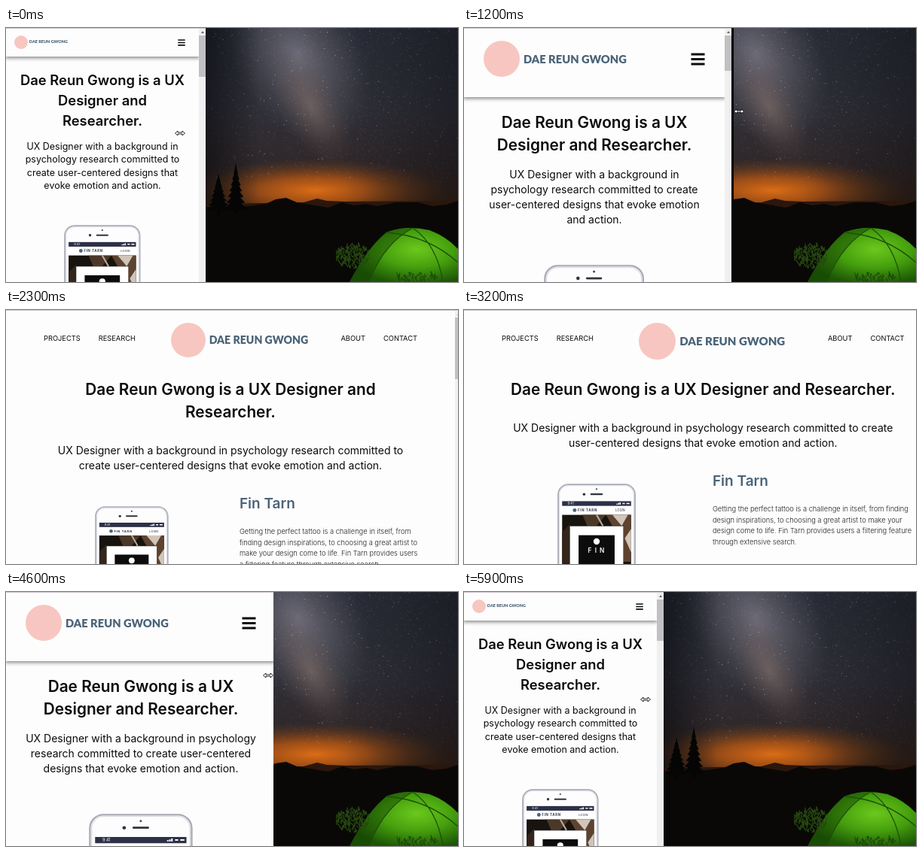
These frames come from a looping animation (600 by 338 pixels, 6 s). An HTML page:

```html
<!DOCTYPE html>
<html lang="en">
<head>
<meta charset="utf-8">
<title>Responsive page resize</title>
<style>
html, body { margin: 0; width: 100%; height: 100%; overflow: hidden; background: #000; }
#stage { position: relative; width: 600px; height: 338px; overflow: hidden; font-family: Inter, Roboto, sans-serif; font-optical-sizing: none; }
#stage > * { position: absolute; left: 0; top: 0; }
#gap { height: 338px; background: #000; }
#win { height: 338px; overflow: hidden; background: #fefdfe; color: #0b0b0d; }
#win::after { content: ""; position: absolute; left: 0; top: 0; width: 100%; height: 1px; background: #cfc6cb; }
#page { position: absolute; left: 0; top: 0; width: var(--w); height: 338px; overflow: hidden; }

header { position: absolute; width: 100%; height: 92px; background: #fefdfe; box-shadow: 0 1px 5px 1px #858585; }
.logo { position: absolute; left: 26px; top: 17px; display: flex; align-items: center; gap: .34em; white-space: nowrap;
  font: 900 14.7px/1 Lato, sans-serif; color: #4a6478; }
.logo i { width: 3.27em; height: 3.27em; border-radius: 50%; background: #f7c6c0; }
.menu { position: absolute; right: 26px; top: 33px; width: 19px; }
nav { position: absolute; top: 31px; display: none; gap: 24px; font-size: 9.3px; line-height: 13px; }
nav.l { left: 50px; }
nav.r { right: 50px; }

main { padding-top: 111px; text-align: center; }
h1 { margin: 0 25px; font-weight: 600; font-size: 20.8px; line-height: 30px; }
h1 br { display: none; }
.sub { margin: 14px 25px 50px; font-size: 14px; line-height: 20px; }
.row { position: relative; text-align: left; }
.phone { display: block; margin: auto; width: calc(var(--w) * .385); }
.work { display: none; position: absolute; left: calc(var(--w) * .52); top: -13px; width: max(212px, calc(var(--w) * .78 - 224px)); }
h2 { margin: 0 0 20px; font-weight: 600; font-size: 19px; line-height: 20px; color: #4a6478; }
.work p { margin: 0; font-weight: 300; font-size: 9.3px; line-height: 14.7px; color: #222; }

.small header { height: 38px; }
.small .logo { left: 11px; top: 10px; font-size: 5.5px; }
.small .menu { right: 18.5px; top: 15px; width: 10px; }
.small main { padding-top: 55.5px; }
.small h1 { margin: 0 12px; font-size: 18.4px; line-height: 27px; }
.small h1 br { display: inline; }
.small .sub { margin: 12px 22px 43px; font-size: 12.5px; line-height: 17.6px; }
.small .phone { width: calc(var(--w) * .397); }

.large header { box-shadow: none; }
.large .logo { left: calc(var(--w) * .346 + 12.5px); font-size: calc(var(--w) * .0237); }
.large .menu { display: none; }
.large nav { display: flex; }
.large main { padding-top: 91px; }
.large h1 { margin: 0 50px; }
.large .sub { margin: 26px 48.5px 44px; }
.large .phone { margin-left: calc(var(--w) * .154 + 26.4px); width: calc(var(--w) * .164); }
.large .work { display: block; }

#bar { position: absolute; left: var(--w); top: 1px; width: 9px; height: 337px; background: #f1f0f1; }
#bar::before { content: ""; position: absolute; left: 2.5px; top: 3px; border: 2px solid transparent; border-top: 0; border-bottom: 3px solid #666; }
#bar i { position: absolute; left: 0; top: 9px; width: 9px; height: 47px; background: #c1c0c2; }
.small #bar i { height: 55px; }
.large #bar i { height: 82px; }
</style>
</head>
<body>
<div id="stage">
  <svg width="600" height="338" viewBox="0 0 600 338">
    <defs>
      <linearGradient id="sky" x2="0" y2="1">
        <stop stop-color="#292c37"/><stop offset=".45" stop-color="#2f3038"/>
        <stop offset=".75" stop-color="#30282a"/><stop offset="1" stop-color="#3a2312"/>
      </linearGradient>
      <radialGradient id="glow"><stop stop-color="#dc6d15"/><stop offset=".4" stop-color="#b45716" stop-opacity=".8"/><stop offset="1" stop-color="#6e3d1c" stop-opacity="0"/></radialGradient>
      <radialGradient id="milk"><stop stop-color="#84818e" stop-opacity=".75"/><stop offset=".5" stop-color="#726f7b" stop-opacity=".4"/><stop offset="1" stop-color="#5a5862" stop-opacity="0"/></radialGradient>
      <radialGradient id="dust"><stop stop-color="#86716a" stop-opacity=".6"/><stop offset="1" stop-color="#5c4c48" stop-opacity="0"/></radialGradient>
      <linearGradient id="shade"><stop offset=".44" stop-color="#07080c" stop-opacity=".6"/><stop offset=".56" stop-color="#07080c" stop-opacity="0"/>
        <stop offset=".75" stop-color="#07080c" stop-opacity="0"/><stop offset="1" stop-color="#07080c" stop-opacity=".4"/></linearGradient>
      <radialGradient id="tent" cx=".62" cy=".4" r=".65"><stop stop-color="#6cc81c"/><stop offset=".5" stop-color="#46a00e"/><stop offset="1" stop-color="#1d5606"/></radialGradient>
    </defs>
    <rect width="600" height="240" fill="url(#sky)"/>
    <ellipse cx="388" cy="38" rx="125" ry="85" fill="url(#milk)" transform="rotate(60 388 38)"/>
    <ellipse cx="405" cy="105" rx="85" ry="42" fill="url(#dust)" transform="rotate(62 405 105)"/>
    <ellipse cx="410" cy="216" rx="175" ry="42" fill="url(#glow)"/>
    <path id="faint" stroke="#c9cbd8" stroke-width=".8" opacity=".22"/>
    <path id="bright" stroke="#f1f0f5" stroke-width="1" opacity=".5"/>
    <rect width="600" height="240" fill="url(#shade)"/>
    <path d="M260 240V234L340 233L395 232L413 227L426 230L450 231L600 230V240Z" fill="#2b160c"/>
    <path d="M0 338V238H290L322 237L345 234L358 228L372 226L386 232L404 235L428 239L446 232L462 236L478 234L492 237L518 232L546 232L566 237L584 235L600 230V338Z" fill="#090807"/>
    <path id="trees" fill="#050505"/>
    <path d="M456 338Q480 292 505 272Q530 262 562 269Q584 277 600 294V338Z" fill="url(#tent)"/>
    <path d="M456 338Q480 292 505 272Q514 267 540 266Q500 288 482 338Z" fill="#123f04" opacity=".45"/>
    <path d="M540 266Q500 288 482 338M540 266Q572 288 580 338M505 272Q560 276 600 312" fill="none" stroke="#1a5206" stroke-width="1.3"/>
    <path id="bush" fill="none" stroke="#26480f" stroke-width="1.3"/>
    <path id="grass" fill="none" stroke="#1c4a0a" stroke-width="1.2"/>
  </svg>
  <div id="gap"></div>
  <div id="win">
    <div id="page">
      <header>
        <nav class="l"><span>PROJECTS</span><span>RESEARCH</span></nav>
        <div class="logo"><i></i><span>DAE REUN GWONG</span></div>
        <nav class="r"><span>ABOUT</span><span>CONTACT</span></nav>
        <svg class="menu" viewBox="0 0 19 17"><path d="M.5 2H18.5M.5 8.5H18.5M.5 15H18.5" stroke="#0b0b0d" stroke-width="3"/></svg>
      </header>
      <main>
        <h1>Dae Reun Gwong is a UX Designer and <br>Researcher.</h1>
        <p class="sub">UX Designer with a background in psychology research committed to create user-centered designs that evoke emotion and action.</p>
        <div class="row">
          <svg class="phone" viewBox="0 0 100 200" font-family="Inter, sans-serif">
            <rect x="1" y="1" width="98" height="198" rx="13" fill="#fdfdfe" stroke="#a9acb6" stroke-width="1.7"/>
            <rect x="2.6" y="2.6" width="94.8" height="194.8" rx="11.5" fill="none" stroke="#dcdde2"/>
            <circle cx="50" cy="7" r="1.1" fill="#444850"/>
            <circle cx="34" cy="13.6" r="1.7" fill="#30333c"/>
            <path d="M43 13.6H57" stroke="#30333c" stroke-width="2" stroke-linecap="round"/>
            <rect x="6" y="22.5" width="88" height="160" fill="#fff"/>
            <rect x="6" y="22.5" width="88" height="6" fill="#2d3147"/>
            <text x="13" y="27" font-size="4" fill="#fff">9:41</text>
            <path d="M76 26.8v-1.2M78 26.8v-2M80 26.8v-2.8M83 25.4h3M88 25.4h4" stroke="#fff" stroke-width="1.5"/>
            <circle cx="22" cy="34" r="2.4" fill="#4a6478"/>
            <text x="26" y="35.5" font-size="4.2" font-weight="700" letter-spacing=".7" fill="#2d3147">FIN TARN</text>
            <text x="74" y="35.5" font-size="4" fill="#2d3147">LOGIN</text>
            <rect x="6" y="40" width="88" height="143" fill="#17130f"/>
            <path d="M32 40H62L50 54H38Z" fill="#4b3828"/>
            <path d="M62 40H94V100H84V54H70Z" fill="#5d4330"/>
            <path d="M70 40l12 14 8-14zM86 70l8-12v30z" fill="#d1c5ba"/>
            <path d="M6 62l10-10v50H6z" fill="#33251b"/>
            <path d="M50 40l8 14" stroke="#b9aa9c" stroke-width="2"/>
            <rect x="16" y="54.5" width="68" height="90" fill="#fff"/>
            <rect x="27" y="66" width="46" height="66" fill="#0d0c0d"/>
            <circle cx="50" cy="74" r="4" fill="#fff"/>
            <text x="51.5" y="88" font-size="8" font-weight="600" letter-spacing="4" text-anchor="middle" fill="#fff">FIN</text>
          </svg>
          <div class="work">
            <h2>Fin Tarn</h2>
            <p>Getting the perfect tattoo is a challenge in itself, from finding design inspirations, to choosing a great artist to make your design come to life. Fin Tarn provides users a filtering feature through extensive search.</p>
          </div>
        </div>
      </main>
    </div>
    <div id="bar"><i></i></div>
  </div>
  <svg id="cursor" width="16" height="10" viewBox="-8 -5 16 10">
    <path d="M-6.5 0L-3 -3V-1H3V-3L6.5 0L3 3V1H-3V3Z" fill="#fff" stroke="#111" stroke-width=".9"/>
  </svg>
</div>
<script>
const $ = id => document.getElementById(id);
const LOOP = 6000, STEP = 100;

// time, layout width, visible edge, dark gap, pointer x, pointer y
const KEYS = [
  [0, 265, 265, 0, 231, 140],
  [500, 265, 265, 0, 250, 132],
  [800, 289, 289, 2, 294, 123],
  [1200, 355, 355, 3, 365, 111],
  [1900, 558, 562, 5, 567, 97],
  [2300, 605, 608, 5, 640, 97],
  [2900, 645, 645, 5, 660, 97],
  [3500, 642, 640, 6, 638, 97],
  [3800, 571, 565, 6, 559, 97],
  [4200, 462, 455, 3, 448, 104],
  [4600, 367, 355, 0, 348, 111],
  [4900, 290, 278, 0, 270, 120],
  [5200, 267, 265, 0, 246, 134],
  [5900, 265, 265, 0, 241, 143],
  [LOOP, 265, 265, 0, 231, 140]
];

function pose(t) {
  const i = KEYS.findIndex(k => k[0] > t);
  const a = KEYS[i - 1], b = KEYS[i];
  const u = (t - a[0]) / (b[0] - a[0]);
  return a.map((v, n) => v + (b[n] - v) * u);
}

let seed = 7;
const rnd = () => (seed = seed * 16807 % 2147483647) / 2147483647;

function scatter(id, count, mark) {
  $(id).setAttribute("d", Array.from({ length: count }, mark).join(""));
}

const star = () => `M${(255 + rnd() * 345).toFixed(1)} ${(rnd() ** 1.2 * 205).toFixed(1)}h1`;

// Short strokes fanning out of an elliptical clump
const leaf = (cx, cy, rx, ry) => () => {
  const a = rnd() * 2 * Math.PI, r = Math.sqrt(rnd());
  const x = cx + Math.cos(a) * r * rx, y = cy + Math.sin(a) * r * ry;
  return `M${x.toFixed(1)} ${y.toFixed(1)}l${(rnd() * 8 - 4).toFixed(1)} ${(-2 - rnd() * 4).toFixed(1)}`;
};

function conifer(x, top, base, half) {
  const tiers = 7, h = (base - top) / tiers;
  let d = "";
  for (let i = 0; i < tiers; i++) {
    const y = top + i * h, w = half * (i + 1.5) / (tiers + .5);
    d += `M${x} ${y - 6}L${x + w} ${y + h}L${x} ${y + h + 3}L${x - w} ${y + h}Z`;
  }
  return d + `M${x - 2} ${top + 8}h4v${base - top}h-4z`;
}

function draw() {
  const t = Math.floor(performance.now() / STEP) * STEP % LOOP;
  const [, layout, edge, gap, x, y] = pose(t);
  const win = $("win");
  win.className = layout < 300 ? "small" : layout < 466 ? "" : "large";
  win.style.setProperty("--w", layout - 9 + "px");
  win.style.width = edge + "px";
  $("gap").style.width = edge + gap + "px";
  $("cursor").style.transform = `translate(${x - 8}px, ${y - 5}px)`;
  requestAnimationFrame(draw);
}

scatter("faint", 1500, star);
scatter("bright", 110, star);
scatter("bush", 150, leaf(460, 305, 22, 16));
scatter("grass", 60, leaf(545, 334, 28, 7));
$("trees").setAttribute("d", conifer(305, 186, 240, 14) + conifer(282, 200, 242, 15));
draw();
</script>
</body>
</html>
```
